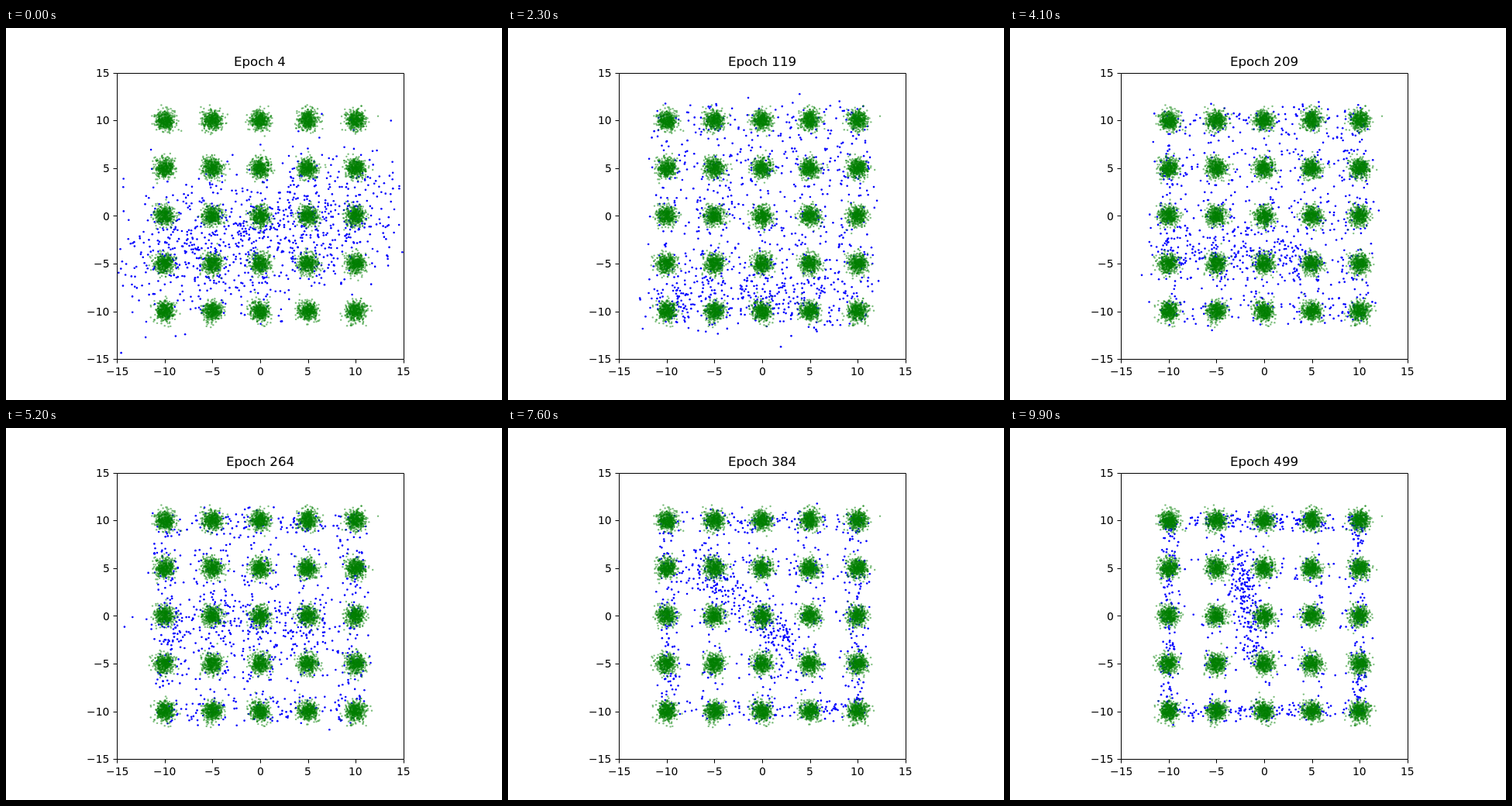
These frames come from a looping animation (640x480 px, 10000 ms). An HTML page with a canvas:

```html
<!DOCTYPE html>
<html lang="en">
<head>
<meta charset="utf-8">
<title>Generator samples by epoch</title>
<style>
html, body { margin: 0; width: 100%; height: 100%; overflow: hidden; background: #fff; }
canvas, svg { position: absolute; left: 0; top: 0; }
text { font: 13.89px "DejaVu Sans", sans-serif; }
#title { font-size: 16.67px; }
</style>
</head>
<body>
<canvas id="plot" width="640" height="480"></canvas>
<svg id="frame" width="640" height="480">
  <path id="axes" fill="none" stroke="#000"/>
  <text id="title"></text>
</svg>
<script>
const $ = id => document.getElementById(id);
const UNIT = 12.32, LIMIT = 15, SAMPLES = 1000, STEPS = 100, STEP_MS = 100;
const px = x => 328 + x * UNIT;
const py = y => 242.4 - y * UNIT;
const snap = v => Math.round(v) + 0.5;
const lerp = (a, b, k) => a + (b - a) * k;
const smooth = (a, b, v) => {
  const k = Math.min(1, Math.max(0, (v - a) / (b - a)));
  return k * k * (3 - 2 * k);
};
const ctx = $('plot').getContext('2d');

// Seeded uniform and normal numbers
let seed = 1;
function rand() {
  seed = (seed + 0x6D2B79F5) | 0;
  let r = Math.imul(seed ^ (seed >>> 15), 1 | seed);
  r = (r + Math.imul(r ^ (r >>> 7), 61 | r)) ^ r;
  return ((r ^ (r >>> 14)) >>> 0) / 4294967296;
}
const normal = () =>
  Math.sqrt(-2 * Math.log(1 - rand())) * Math.cos(2 * Math.PI * rand());
const spread = half => (rand() * 2 - 1) * half;

function dot(c, x, y, r) {
  c.beginPath();
  c.arc(px(x), py(y), r, 0, 7);
  c.fill();
}

// Text starts on whole pixels; align is 0.5 for centred and 1 for right
function place(el, string, x, y, align) {
  el.textContent = string;
  el.setAttribute('x', Math.round(x - el.getComputedTextLength() * align));
  el.setAttribute('y', Math.round(y));
}

function addLabel(string, x, y, align) {
  const el = document.createElementNS('http://www.w3.org/2000/svg', 'text');
  $('frame').append(el);
  place(el, string, x, y, align);
}

function drawAxes() {
  const left = snap(px(-LIMIT)), right = snap(px(LIMIT));
  const top = snap(py(LIMIT)), bottom = snap(py(-LIMIT));
  let d = `M${left} ${top}H${right}V${bottom}H${left}Z`;
  for (let v = -LIMIT; v <= LIMIT; v += 5) {
    const name = String(v).replace('-', '\u2212');
    d += `M${snap(px(v))} ${bottom}v5M${left} ${snap(py(v))}h-5`;
    addLabel(name, px(v), 448, 0.5);
    addLabel(name, 133.5, py(v) + 5.1, 1);
  }
  $('axes').setAttribute('d', d);
}

// The fixed data: a 5 by 5 grid of normal clusters
function makeClusters() {
  const layer = document.createElement('canvas');
  layer.width = 640;
  layer.height = 480;
  const c = layer.getContext('2d');
  c.fillStyle = 'rgba(0,128,0,0.5)';
  for (let gx = -10; gx <= 10; gx += 5)
    for (let gy = -10; gy <= 10; gy += 5)
      for (let i = 0; i < 500; i++)
        dot(c, gx + normal() * 0.5, gy + normal() * 0.5, 1.2);
  return layer;
}

// One generated point; p is the training progress from 0 to 1
function sample(p) {
  // At first a wide, slightly tilted cloud
  if (rand() > smooth(0, 0.15, p)) {
    const x = spread(12) + normal() * 2.5;
    return [x, -2 + x * 0.17 + normal() * 3.6];
  }
  const kind = rand(), border = 0.5 * p ** 1.5;
  if (kind < border) {
    const along = spread(10.4);
    const side = (rand() < 0.5 ? -10 : 10) + normal() * lerp(1, 0.45, p);
    return rand() < 0.5 ? [along, side] : [side, along];
  }
  // A ridge that rises from the bottom, then turns upright
  if (kind < border + 0.2) {
    const turn = smooth(0.65, 0.88, p), width = lerp(2, 0.7, p);
    const angle = lerp(0, -1.4, turn), along = spread(lerp(9, 5.5, turn));
    const rise = lerp(-9, 1, smooth(0.15, 0.67, p));
    return [-2 + along * Math.cos(angle) + normal() * width,
      rise + along * Math.sin(angle) + normal() * width];
  }
  // The rest fills the box, drawn towards the grid lines over time
  const half = lerp(12, 10, p);
  const point = [spread(half) + normal() * 0.6, spread(half) + normal() * 0.6];
  const axis = rand() < 0.5 ? 0 : 1;
  point[axis] = lerp(point[axis], Math.round(point[axis] / 5) * 5, p / 2);
  return point;
}

drawAxes();
const clusters = makeClusters();

function draw(step) {
  place($('title'), 'Epoch ' + (4 + 5 * step), 327.65, 49, 0.5);
  ctx.clearRect(0, 0, 640, 480);
  ctx.fillStyle = '#00f';
  seed = 1000 + step * 7919;
  for (let i = 0; i < SAMPLES; i++) {
    const [x, y] = sample(step / (STEPS - 1));
    if (Math.max(Math.abs(x), Math.abs(y)) < LIMIT - 0.1) dot(ctx, x, y, 1.3);
  }
  ctx.drawImage(clusters, 0, 0);
}

const start = performance.now();
let shown = -1;
function tick() {
  const step = Math.floor((performance.now() - start) / STEP_MS) % STEPS;
  if (step !== shown) draw(shown = step);
  requestAnimationFrame(tick);
}
tick();
</script>
</body>
</html>
```
